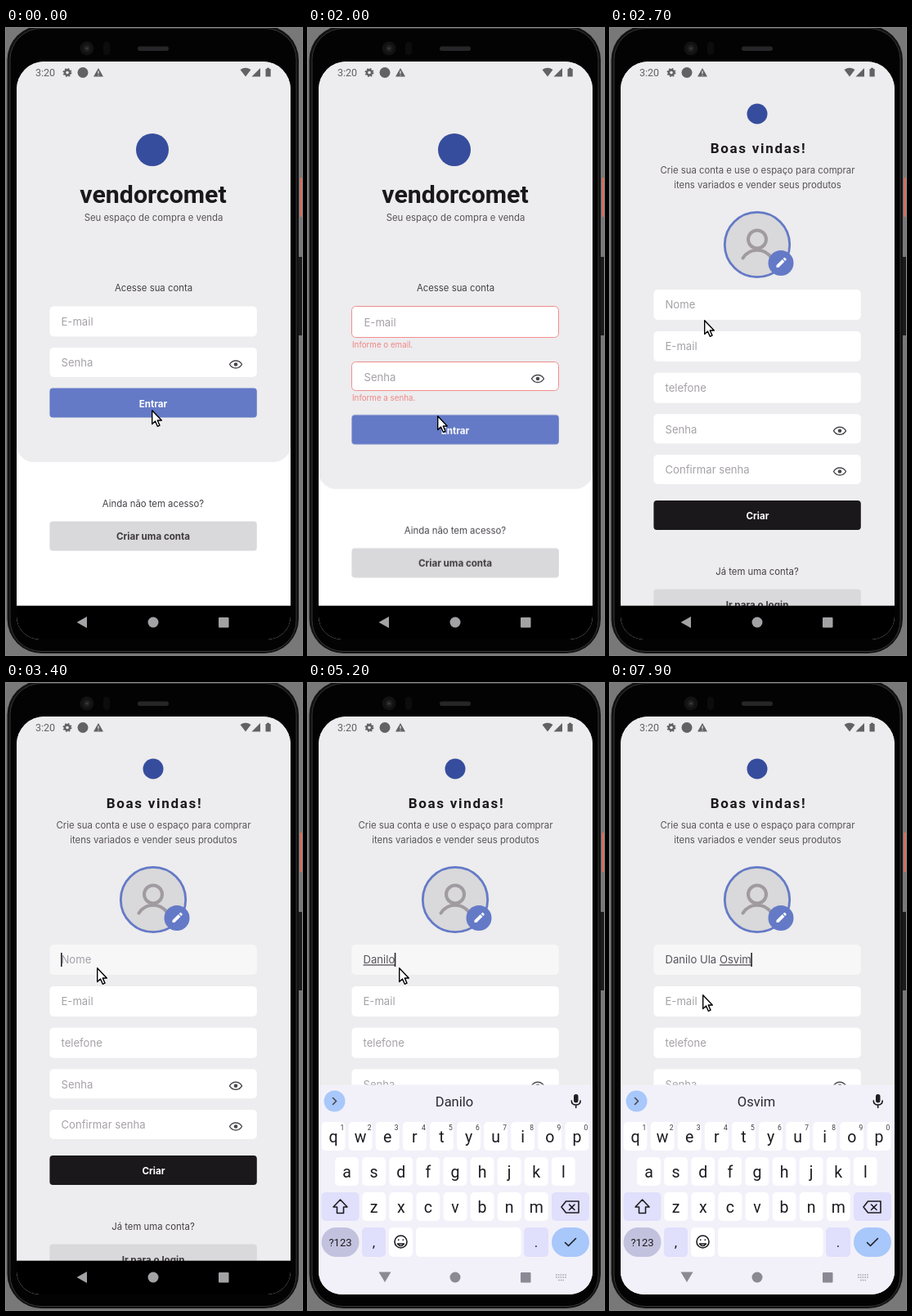
Recreate the animation shown at these times as an HTML page. Size 362 by 767 pixels, loop 8000 ms.

```html
<!DOCTYPE html>
<html lang="pt-BR">
<head>
<meta charset="utf-8">
<title>Cadastro</title>
<style>
html, body { margin: 0; width: 100%; height: 100%; overflow: hidden; background: #787878; }
svg { display: block; width: 362px; height: 767px; }
text { font-family: Inter, "Open Sans", sans-serif; font-size: 11.35px; fill: #57535a; white-space: pre; }
.mid, .key text { text-anchor: middle; }
.hint { font-size: 13.1px; fill: #a5a1a7; }
.dark { fill: #444047; }
.bold { font-weight: 700; font-size: 11.6px; fill: #3e3a40; }
.light { fill: #fff; }
.warn { font-size: 9.75px; fill: #f08686; }
.title, .rob, .key text { font-family: Roboto, "Noto Sans", sans-serif; }
.title { font-weight: 700; fill: #1a181b; }
.box { fill: #fff; }
.bad { fill: #fff; stroke: #f28d8d; }
.line { fill: none; stroke: #47464f; stroke-width: 1.6; stroke-linecap: round; stroke-linejoin: round; }
.ink { stroke: #1c1b20; }
.key text { font-size: 19.5px; fill: #1c1b20; }
.key .num { font-size: 8.5px; fill: #3b3a42; }
.sug { font-size: 16.5px; fill: #2b2a31; }

.ok, .err, #low, #enter, #join, #signup, #name, #pointer { animation: 8s step-end infinite; }
.ok { animation-name: leave; }
.err { animation-name: arrive; }
#low { animation-name: push; }
#enter { fill: #647ac7; animation-name: tapEnter; }
#join { fill: #d9d8da; animation-name: tapJoin; }
#signup { animation-name: open; }
#name { animation-name: focus; }
#pointer { animation-name: point; }
#board { animation: rise 8s linear infinite; }

@keyframes leave { 0% { opacity: 1 } 8.75%, 100% { opacity: 0 } }
@keyframes arrive { 0% { opacity: 0 } 8.75%, 100% { opacity: 1 } }
@keyframes push { 0% { transform: none } 8.75%, 100% { transform: translateY(32.8px) } }
@keyframes tapEnter { 0%, 8.75%, 100% { fill: #647ac7 } 6.25% { fill: #5065b2 } }
@keyframes tapJoin {
  0%, 21.25%, 100% { fill: #d9d8da }
  17.5%, 20% { fill: #cccbce }
  18.75% { fill: #c0bec3 }
}
@keyframes open {
  0% { opacity: 0 }
  26.25% { opacity: .45 }
  27.5% { opacity: .85 }
  28.75%, 100% { opacity: 1 }
}
@keyframes focus { 0% { fill: #fff } 41.25%, 100% { fill: #f7f7f8 } }
@keyframes rise {
  0% { transform: translateY(258px) }
  42.5% { transform: translateY(258px); animation-timing-function: ease-out }
  46.9%, 100% { transform: none }
}
@keyframes point {
  0% { transform: translate(178px, 467px) }
  3.75% { transform: translate(178px, 466px) }
  11.25% { transform: translate(289px, 400px) }
  12.5% { transform: translate(190px, 322px) }
  13.75% { transform: translate(96px, 450px) }
  15% { transform: translate(170px, 664px) }
  23.75% { transform: translate(166px, 600px) }
  25% { transform: translate(158px, 474px) }
  26.25% { transform: translate(140px, 430px) }
  27.5% { transform: translate(127px, 403px) }
  33.75% { transform: translate(115px, 357px) }
  36.25% { transform: translate(112px, 350px) }
  37.5% { transform: translate(111px, 348px) }
  96.25% { transform: translate(111px, 354px) }
  97.5% { transform: translate(112px, 370px) }
  98.75%, 100% { transform: translate(113px, 381px) }
}
</style>
</head>
<body>
<svg viewBox="0 0 362 767">
  <defs>
    <clipPath id="glass">
      <path d="M13 75A34 34 0 0 1 47 41H314A34 34 0 0 1 348 75V720A28 28 0 0 1 320 748H41A28 28 0 0 1 13 720Z"/>
    </clipPath>
    <g id="eye">
      <path d="M-7.5 0C-4-6 4-6 7.5 0C4 6-4 6-7.5 0Z" fill="none" stroke="#4a474c" stroke-width="1.4"/>
      <circle r="2.3" fill="#4a474c"/>
    </g>
    <g id="gear" fill="none" stroke="currentColor">
      <circle r="3.1" stroke-width="2.6"/>
      <circle r="4.7" stroke-width="1.6" stroke-dasharray="1.85"/>
    </g>
  </defs>

  <!-- phone body -->
  <rect x="359.5" y="183" width="3" height="48" rx="1" fill="#d8705f"/>
  <rect x="357" y="280" width="5" height="96" fill="#1b1b1c"/>
  <rect x="1.5" y="-3" width="356.5" height="768" rx="42" fill="#121213"/>
  <rect x="5" y="0.5" width="350" height="762" rx="38" fill="#030303" stroke="#343436"/>
  <circle cx="99" cy="25" r="8.5" fill="#121213"/>
  <circle cx="99" cy="25" r="4.5" fill="#1e1e20"/>
  <circle cx="99" cy="25" r="1.8" fill="#38383c"/>
  <rect x="119" y="17" width="8" height="16" rx="4" fill="#0c0c0d"/>
  <rect x="161" y="22.5" width="38" height="5.5" rx="2.7" fill="#262628"/>

  <g clip-path="url(#glass)">
    <rect x="13" y="41" width="335" height="707" fill="#fff"/>

    <!-- sign-in -->
    <g id="login">
      <g id="low">
        <rect x="13" y="-60" width="335" height="591" rx="21" fill="#edecee"/>
        <rect id="enter" x="53.4" y="440.4" width="253.4" height="36" rx="4"/>
        <text class="mid bold light" x="180" y="463.5">Entrar</text>
        <text class="mid dark" x="180" y="585.5">Ainda não tem acesso?</text>
        <rect id="join" x="53.4" y="603.4" width="253.4" height="36" rx="4"/>
        <text class="mid bold" x="180" y="626.3">Criar uma conta</text>
      </g>
      <circle cx="179" cy="149" r="20" fill="#364d9d"/>
      <text class="mid title" x="180" y="214" style="font-size:30.3px">vendorcomet</text>
      <text class="mid" x="180.5" y="236">Seu espaço de compra e venda</text>
      <text class="mid dark" x="180.5" y="322">Acesse sua conta</text>
      <g class="ok">
        <rect class="box" x="53.4" y="340.5" width="253.4" height="37" rx="5"/>
        <text class="hint" x="67.5" y="364">E-mail</text>
        <rect class="box" x="53.4" y="391" width="253.4" height="36" rx="5"/>
        <text class="hint" x="67.5" y="414">Senha</text>
        <use href="#eye" x="281" y="411.5"/>
      </g>
      <g class="err">
        <rect class="bad" x="53.5" y="340.5" width="253" height="38" rx="5"/>
        <text class="hint" x="68.5" y="365">E-mail</text>
        <text class="warn" x="54" y="391">Informe o email.</text>
        <rect class="bad" x="53.5" y="408.5" width="253" height="35" rx="5"/>
        <text class="hint" x="68.5" y="431.5">Senha</text>
        <use href="#eye" x="281" y="429"/>
        <text class="warn" x="54" y="456">Informe a senha.</text>
      </g>
    </g>

    <!-- sign-up -->
    <g id="signup">
      <rect x="13" y="41" width="335" height="667" fill="#edecee"/>
      <circle cx="180" cy="105" r="12.5" fill="#364d9d"/>
      <text class="mid title" x="181.5" y="153" style="font-size:17px;letter-spacing:1.7px">Boas vindas!</text>
      <text class="mid" x="180.5" y="178">Crie sua conta e use o espaço para comprar</text>
      <text class="mid" x="180.5" y="196">itens variados e vender seus produtos</text>
      <circle cx="180" cy="265" r="39.7" fill="#d9d8da" stroke="#647ac7" stroke-width="2.8"/>
      <g fill="none" stroke="#9f9ba1" stroke-width="4" stroke-linecap="round">
        <circle cx="180" cy="258.5" r="11"/>
        <path d="M162.5 281.5A20.5 20.5 0 0 1 197.5 281.5"/>
      </g>
      <circle cx="209" cy="287.5" r="15.5" fill="#647ac7"/>
      <path d="M203.5 290.3L210.8 283L213.5 285.7L206.2 293H203.5ZM211.6 282.2L213 280.9Q213.5 280.5 214 281L215.5 282.5Q216 283 215.6 283.5L214.3 284.9Z" class="light"/>
      <g id="fields"></g>
      <rect id="caret" x="67" y="330" width="1.6" height="17" fill="#26242b"/>
      <rect x="53.4" y="578" width="253.4" height="36" rx="4" fill="#1a181b"/>
      <text class="mid bold light" x="180.5" y="601">Criar</text>
      <text class="mid dark" x="180" y="669">Já tem uma conta?</text>
      <rect x="53.4" y="686.5" width="253.4" height="36" rx="4" fill="#d9d8da"/>
      <text class="mid bold" x="180" y="710">Ir para o login</text>
    </g>

    <!-- status bar -->
    <g fill="#626166" color="#626166">
      <text class="rob" x="36" y="58.8" style="font-size:12.5px;fill:#626166">3:20</text>
      <use href="#gear" x="75" y="54.5"/>
      <circle cx="94" cy="54.5" r="6.5"/>
      <path d="M113 49L119 59.5H107Z"/>
      <path d="M113 52.5V56M113 57.3V58.3" stroke="#edecee" stroke-width="1.2"/>
      <path d="M286.5 51Q293 46.5 299.5 51L293 59.5Z"/>
      <path d="M311 49V59.5H300.5Z"/>
      <path d="M317.5 50H319V48.8H322V50H323.7V59.5H317.5Z"/>
    </g>

    <!-- navigation bar -->
    <rect x="13" y="706.7" width="335" height="42" fill="#000"/>
    <g fill="#a3a3a5">
      <path d="M86.5 727L99 720V734Z"/>
      <circle cx="180" cy="727" r="6.5"/>
      <rect x="260" y="721" width="12.5" height="12.5" rx="1"/>
    </g>

    <!-- keyboard -->
    <g id="board">
      <rect x="13" y="491.5" width="335" height="260" fill="#f2f1fa"/>
      <circle cx="32.5" cy="511.5" r="13" fill="#a8c7fa"/>
      <path id="chevron" class="line" d="M2-4L-2 0L2 4"/>
      <g id="tools" color="#47464f">
        <path class="line" d="M74 504.5H85Q87 504.5 87 506.5V513L81.5 518.5H74Q72 518.5 72 516.5V506.5Q72 504.5 74 504.5ZM87 513H83Q81.5 513 81.5 514.5V518.5M76.5 512Q79 515 82 512M76.5 508.5V508.6M82.5 508.5V508.6"/>
        <text class="mid rob dark" x="127" y="515.3" style="font-size:11.5px;font-weight:700">GIF</text>
        <path class="line" d="M170.5 505.5H168.5V518.5H180V505.5H178M171.5 504H177V507.5H171.5ZM171.5 511H177M171.5 514.5H175.5"/>
        <use href="#gear" transform="translate(221 511.5) scale(1.15)"/>
        <path d="M250.5 502V521" stroke="#d3d2dc"/>
        <g fill="#47464f"><circle cx="275" cy="511.5" r="1.5"/><circle cx="280" cy="511.5" r="1.5"/><circle cx="285" cy="511.5" r="1.5"/></g>
      </g>
      <g id="tips">
        <path id="bars" d="M132.5 502V522M226 502V522" stroke="#d3d2dc"/>
        <text class="mid rob sug" x="91" y="518"></text>
        <text class="mid rob sug" x="179" y="518"></text>
        <text class="mid rob sug" x="267" y="518"></text>
      </g>
      <rect x="325" y="503" width="5.5" height="10.5" rx="2.7" fill="#1f1e24"/>
      <path class="line ink" d="M322.3 511Q322.3 516 327.7 516T333.2 511M327.7 516V519.5"/>
      <g id="keys" class="key"></g>
      <path id="shift" class="line ink" d="M39.5 632L48 641H43.5V648.5H35.5V641H31Z"/>
      <path class="line ink" d="M315.5 634H331V648H315.5L310 641ZM319.5 638L326 644.5M326 638L319.5 644.5"/>
      <g class="line ink">
        <circle cx="113.5" cy="683.5" r="7.5"/>
        <path d="M109.5 686Q113.5 691 117.5 686ZM110.7 681V681.5M116.3 681V681.5"/>
      </g>
      <path class="line ink" d="M314.5 684.5L318.5 688.5L327.5 679.5"/>
      <g fill="#8b8a94">
        <path d="M86.5 720.5H101.5L94 733Z"/>
        <circle cx="180" cy="727" r="6.5"/>
        <rect x="260" y="721" width="12.5" height="12.5" rx="1"/>
      </g>
      <path d="M303 724H316M303 727H316M306 730.5H313" stroke="#a5a4ae" stroke-width="1.5" stroke-dasharray="1.6 1.2"/>
    </g>
  </g>

  <path id="pointer" d="M.7.8V17.5L4.5 14L7.3 20.3L10 19.1L7.3 13H12.3Z" fill="#fff" stroke="#000" stroke-width="1.4" stroke-linejoin="round"/>
</svg>

<script>
const $ = id => document.getElementById(id);
const rect = (x, y, w, h, r, fill) =>
  `<rect x="${x}" y="${y}" width="${w}" height="${h}" rx="${r}" fill="${fill}"/>`;

// sign-up form: label, top, height, has eye icon
$('fields').innerHTML = [
  ['Nome', 320, 37], ['E-mail', 371, 37], ['telefone', 421.7, 37],
  ['Senha', 472.3, 36, 1], ['Confirmar senha', 522, 36, 1]
].map(([label, y, h, eye], i) =>
  `<rect ${i ? '' : 'id="name"'} class="box" x="53.4" y="${y}" width="253.4" height="${h}" rx="5"/>
   <text ${i ? '' : 'id="value"'} class="hint" x="67.5" y="${y + 23.3}">${label}</text>
   ${eye ? `<use href="#eye" x="281" y="${y + 20.5}"/>` : ''}`).join('');

// keyboard
const pitch = 33.1, lilac = '#e0dffc';
const row = (letters, x0, y) => [...letters].map((c, i) => {
  const x = x0 + i * pitch;
  const digit = y < 570 ? `<text class="num" x="${x + 11}" y="${y + 10}">${(i + 1) % 10}</text>` : '';
  return rect(x - 14.4, y, 28.8, 35, 5, '#fff') +
    `<text class="letter" x="${x}" y="${y + 24.7}">${c}</text>` + digit;
}).join('');
$('keys').innerHTML =
  row('QWERTYUIOP', 31, 537) + row('ASDFGHJKL', 47.5, 580) + row('ZXCVBNM', 80.7, 623) +
  rect(16.5, 623, 46, 35, 5, lilac) + rect(298, 623, 46, 35, 5, lilac) +
  rect(16.5, 666, 46, 36, 18, '#c3c2de') + rect(66, 666, 29, 36, 5, lilac) +
  rect(99, 666, 29, 36, 5, '#fff') + rect(132, 666, 128.5, 36, 5, '#fff') +
  rect(264, 666, 30, 36, 5, lilac) + rect(298, 666, 46, 36, 18, '#a8c7fa') +
  `<text x="39.5" y="689" style="font-size:13px">?123</text>
   <text x="80.5" y="690" style="font-size:17px">,</text>
   <text x="279" y="690" style="font-size:17px">.</text>`;

const typed = 'Danilo Ula Osvim';
const strokes = [4300, 4500, 4600, 4700, 5100, 5200, 5300, 5500, 5600, 5700, 5900, 6100, 6400, 6500, 6600, 6700];
const tips = [
  [4300, 'D', 'De', 'Da'], [4600, 'Da', 'Dan', 'Das'], [4900, 'Dani', 'Danilo', 'Dano'],
  [5200, '', 'Danilo', ''], [5300, 'e', 'da', 'de'], [5500, 'U', 'Um', 'Uma'],
  [5800, '', 'Ula', ''], [5900, 'e', 'da', 'de'], [6200, 'O', 'Of', 'I'],
  [6500, 'Os', 'Osso', 'Ou'], [6900, '', 'Osvim', '']
];
const letters = document.querySelectorAll('.letter');
const slots = document.querySelectorAll('.sug');
const show = (el, on) => el.setAttribute('visibility', on ? 'inherit' : 'hidden');
let lastCount = -1;

function type(count) {
  const text = typed.slice(0, count);
  const start = text.lastIndexOf(' ') + 1;
  const value = $('value');
  value.innerHTML = count
    ? `${text.slice(0, start)}<tspan text-decoration="underline">${text.slice(start)}</tspan>`
    : 'Nome';
  value.style.fill = count ? '#57535a' : '';
  $('caret').setAttribute('x', 67 + (count ? value.getComputedTextLength() : 0));
  letters.forEach(el => el.textContent = count ? el.textContent.toLowerCase() : el.textContent.toUpperCase());
  $('shift').style.fill = count ? 'none' : '#1c1b20';
  $('chevron').setAttribute('transform', `translate(32.5 511.5) rotate(${count ? 180 : 0})`);
  show($('tools'), !count);
  show($('tips'), count);
}

function draw(t) {
  const count = strokes.filter(s => s <= t).length;
  if (count !== lastCount) type(lastCount = count);
  const words = tips.filter(tip => tip[0] <= t).pop() || [0, '', '', ''];
  slots.forEach((el, i) => el.textContent = words[i + 1]);
  show($('bars'), words[1]);
  show($('caret'), (t >= 3400 && t < 3800) || (t >= 4300 && t < 7400) || t >= 7700);
}

// one shared starting point for the CSS and scripted parts
const begin = performance.now();
document.getAnimations().forEach(a => a.startTime = document.timeline.currentTime);
function tick() {
  draw((performance.now() - begin) % 8000);
  requestAnimationFrame(tick);
}
tick();
</script>
</body>
</html>
```
